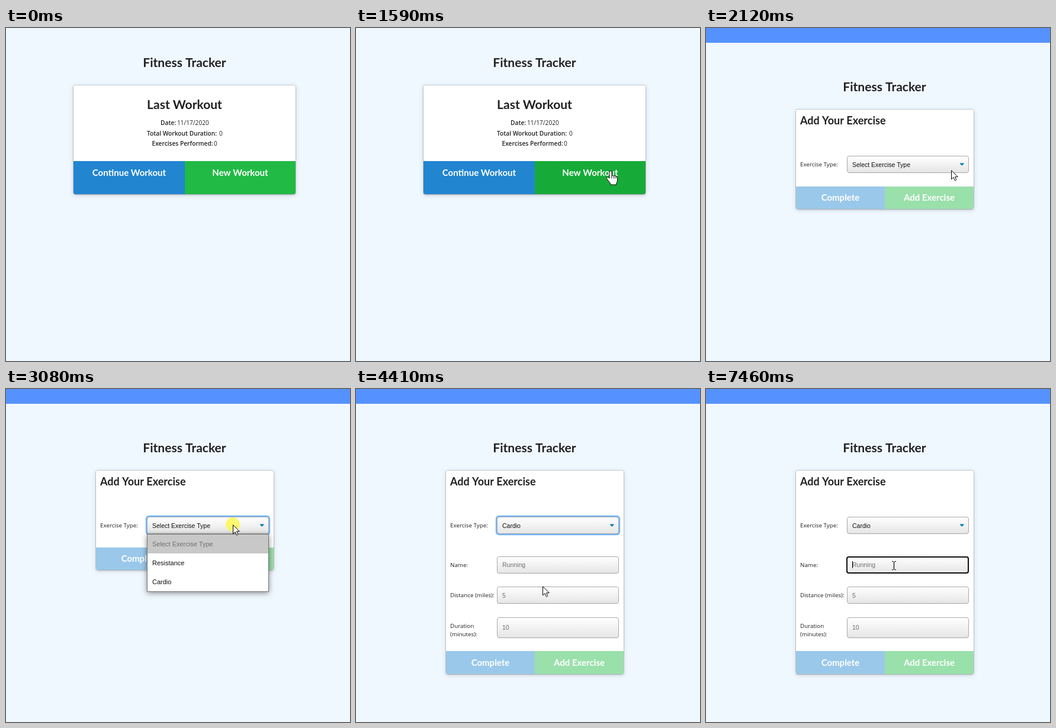
An HTML page with a canvas that plays this animation: 581 px wide and 563 px high, repeating every 7.99 s.

```html
<!DOCTYPE html>
<html lang="en">
<head>
<meta charset="utf-8">
<title>Fitness Tracker</title>
<style>
html, body { margin: 0; width: 100%; height: 100%; overflow: hidden; background: #f0f8ff; }
canvas { display: block; width: 581px; height: 563px; }
</style>
</head>
<body>
<canvas id="stage" width="581" height="563"></canvas>
<script>
const ctx = document.getElementById('stage').getContext('2d');
const W = 581, H = 563, LOOP = 7990;

const INK = '#212121', BLUE = '#2185d0', GREEN = '#21ba45', GREEN_HOVER = '#16ab39';
const lato = size => `700 ${size}px Lato, sans-serif`;
const open = (size, weight = 400) => `${weight} ${size}px "Open Sans", sans-serif`;
const arial = size => `${size}px "Liberation Sans", Arial, sans-serif`;

// Pointer moves: start, end, number of steps, destination
const START = [572, 585];
const MOVES = [
  [420, 820, 6, 541, 377],
  [1050, 1350, 5, 432, 264],
  [1510, 1590, 2, 430, 242],
  [1660, 1740, 2, 414, 240],
  [2290, 2290, 1, 407, 245],
  [2610, 2910, 5, 383, 229],
  [3620, 3780, 3, 350, 286],
  [3860, 3920, 2, 315, 333],
  [4710, 5030, 5, 315, 298]
];
const CLICKS = [[1820, 1970], [2990, 3140], [4240, 4410], [5350, 5500]];
const CARET_FLIPS = [5350, 5900, 6450, 6980, 7460];

function pointerAt(t) {
  let [x, y] = START;
  for (const [t0, t1, n, tx, ty] of MOVES) {
    if (t < t0) break;
    const step = t >= t1 ? n : Math.floor((t - t0) / (t1 - t0) * (n - 1) + 0.001) + 1;
    x += (tx - x) * step / n;
    y += (ty - y) * step / n;
    if (t < t1) break;
  }
  return [Math.round(x), Math.round(y)];
}

function text(str, x, y, font, color = INK, align = 'left') {
  ctx.font = font;
  ctx.fillStyle = color;
  ctx.textAlign = align;
  ctx.fillText(str, x, y);
}

function rect(x, y, w, h, color) {
  ctx.fillStyle = color;
  ctx.fillRect(x, y, w, h);
}

function round(x, y, w, h, r) {
  ctx.beginPath();
  ctx.roundRect(x, y, w, h, r);
}

function shadowFill(color, dy, blur, shadow) {
  ctx.save();
  ctx.shadowColor = shadow;
  ctx.shadowBlur = blur;
  ctx.shadowOffsetY = dy;
  ctx.fillStyle = color;
  ctx.fill();
  ctx.restore();
}

function card(x, y, w, h) {
  round(x, y, w, h, 3);
  shadowFill('#fff', 1.5, 8, 'rgba(34,36,38,.15)');
  shadowFill('#fff', 1.5, 3, 'rgba(34,36,38,.14)');
  round(x - 0.5, y - 0.5, w + 1, h + 1, 3.5);
  ctx.strokeStyle = 'rgba(34,36,38,.16)';
  ctx.lineWidth = 1;
  ctx.stroke();
}

function button(label, x, y, w, h, color, corners, base, alpha = 1) {
  round(x, y, w, h, corners);
  ctx.fillStyle = '#fff';
  ctx.fill();
  ctx.globalAlpha = alpha;
  ctx.fillStyle = color;
  ctx.fill();
  ctx.globalAlpha = 1;
  text(label, x + w / 2, base, lato(15), '#fff', 'center');
}

function field(y, h, value, color, base) {
  const g = ctx.createLinearGradient(0, y, 0, y + h);
  g.addColorStop(0, '#fff');
  g.addColorStop(1, '#e5e5e5');
  round(238, y + 1, 206, h, 4);
  ctx.fillStyle = 'rgba(0,0,0,.04)';
  ctx.fill();
  round(238.5, y + 0.5, 205, h - 1, 3.5);
  ctx.fillStyle = g;
  ctx.fill();
  ctx.strokeStyle = '#aaa';
  ctx.lineWidth = 1;
  ctx.stroke();
  text(value, 247, base, arial(10.5), color);
}

function select(value, focused) {
  if (focused) {
    round(235.8, 213.8, 210.4, 33.4, 6);
    ctx.fillStyle = 'rgba(59,153,252,.7)';
    ctx.fill();
  }
  field(216, 29, value, '#111', 235);
  ctx.beginPath();
  ctx.moveTo(429, 229);
  ctx.lineTo(435.5, 229);
  ctx.lineTo(432.2, 232.3);
  ctx.closePath();
  ctx.fillStyle = ctx.strokeStyle = '#007cb2';
  ctx.lineJoin = 'round';
  ctx.lineWidth = 1;
  ctx.fill();
  ctx.stroke();
}

function menu(hover) {
  ctx.beginPath();
  ctx.rect(238, 245, 206, 98);
  shadowFill('#767676', 2, 9, 'rgba(0,0,0,.45)');
  rect(239, 246, 204, 96, '#fff');
  if (hover) rect(239, 246 + 32 * hover, 204, 32, '#1e90ff');
  else rect(239, 246, 204, 32, '#c8c8c8');
  ['Select Exercise Type', 'Resistance', 'Cardio'].forEach((item, i) => {
    const color = i === 0 ? '#6f6f6f' : i === hover ? '#fff' : '#101010';
    text(item, 247, 266 + 32 * i, arial(11), color);
  });
}

function homePage(t) {
  text('Fitness Tracker', 301.5, 66, lato(21), INK, 'center');
  card(114, 97, 375, 184);
  text('Last Workout', 301.5, 137, lato(21), INK, 'center');
  text('Date:', 261, 164, open(10.2, 600));
  text('11/17/2020', 289, 164, open(10.15));
  text('Total Workout Duration:', 238, 182, open(10.2, 600));
  text('0', 360, 182, open(10.15));
  text('Exercises Performed:', 246.5, 199, open(10.2, 600));
  text('0', 351, 199, open(10.15));
  button('Continue Workout', 114, 225, 188, 56, BLUE, [0, 0, 0, 3], 250);
  button('New Workout', 302, 225, 187, 56, t >= 1510 ? GREEN_HOVER : GREEN, [0, 0, 3, 0], 250);
}

function exercisePage(t, y) {
  const cardio = t >= 4410, named = t >= 5350;
  const foot = cardio ? 443 : 268, end = cardio ? 482 : 306;
  rect(0, 0, W, 25, '#5592ff');
  text('Fitness Tracker', 301.5, 107, lato(21), INK, 'center');
  card(152, 138, 300, end - 138);
  text('Add Your Exercise', 159, 163, lato(18));
  button('Complete', 152, foot, 150, end - foot, BLUE, [0, 0, 0, 3], end - 14, 0.45);
  button('Add Exercise', 302, foot, 150, end - foot, GREEN, [0, 0, 3, 0], end - 14, 0.45);

  text('Exercise Type:', 159, 234, open(9.8));
  select(cardio ? 'Cardio' : 'Select Exercise Type', t >= 2990 && !named);
  if (t >= 3080 && !cardio) menu(y >= 310 ? 2 : y >= 278 ? 1 : 0);
  if (!cardio) return;

  text('Name:', 159, 301, open(9.8));
  text('Distance (miles):', 159, 352, open(9.8));
  text('Duration', 159, 404, open(9.8));
  text('(minutes):', 159, 417.5, open(9.8));
  field(283, 29, 'Running', '#6f6f6f', 301);
  field(334, 29, '5', '#6f6f6f', 353);
  field(386, 35, '10', '#6f6f6f', 407);
  if (named) {
    round(238, 284, 205, 27, 3);
    ctx.strokeStyle = '#101010';
    ctx.lineWidth = 2;
    ctx.stroke();
    const flips = CARET_FLIPS.filter(f => t >= f).length;
    if (flips % 2) rect(247, 291, 1, 12, '#000');
  }
}

const ARROW = new Path2D('M.5 .8V15.8L4 12.5L6.3 17.8Q7.6 18.6 8.8 16.8L6.6 11.7H11.3Z');
const HAND = new Path2D('M-2 12V1.5a2 2 0 0 1 4 0V8q2-2 3.7 0q2-1 3.3 .8q2-.6 2.5 1.2V15' +
  'c0 4-2 4.5-2 8H0c0-3-3-5-6-9.8c-1.5-2.5 1-4 2.5-2.3z');
const KNUCKLES = new Path2D('M2 8v4.5M5.7 8v4.5M9 9v3.5');
const BEAM = new Path2D('M-.5 .5h2.5M4 .5h2.5M3 1v13M-.5 14.5h2.5M4 14.5h2.5');

function pointer(kind, x, y) {
  ctx.save();
  ctx.translate(x, y);
  ctx.strokeStyle = '#000';
  ctx.fillStyle = '#fff';
  ctx.lineJoin = 'round';
  ctx.lineWidth = 1;
  if (kind === 'beam') {
    ctx.translate(-0.5, -7);
    ctx.lineWidth = 1.2;
    ctx.stroke(BEAM);
  } else {
    const shape = kind === 'hand' ? HAND : ARROW;
    ctx.fill(shape);
    ctx.stroke(shape);
    if (kind === 'hand') ctx.stroke(KNUCKLES);
  }
  ctx.restore();
}

function draw(t) {
  const [x, y] = pointerAt(t);
  rect(0, 0, W, H, '#f0f8ff');
  if (t < 2120) homePage(t);
  else exercisePage(t, y);

  if (CLICKS.some(([a, b]) => t >= a && t < b)) {
    ctx.beginPath();
    ctx.arc(x, y, 12, 0, Math.PI * 2);
    ctx.fillStyle = 'rgba(255,248,60,.72)';
    ctx.fill();
  }
  if (t < 420) return;
  const overButton = t >= 1510 && t < 2120;
  const overName = t >= 4410 && y >= 283 && y < 312;
  pointer(overButton ? 'hand' : overName ? 'beam' : 'arrow', x, y);
}

const begin = performance.now();
function frame() {
  draw((performance.now() - begin) % LOOP);
  requestAnimationFrame(frame);
}
frame();
</script>
</body>
</html>
```
